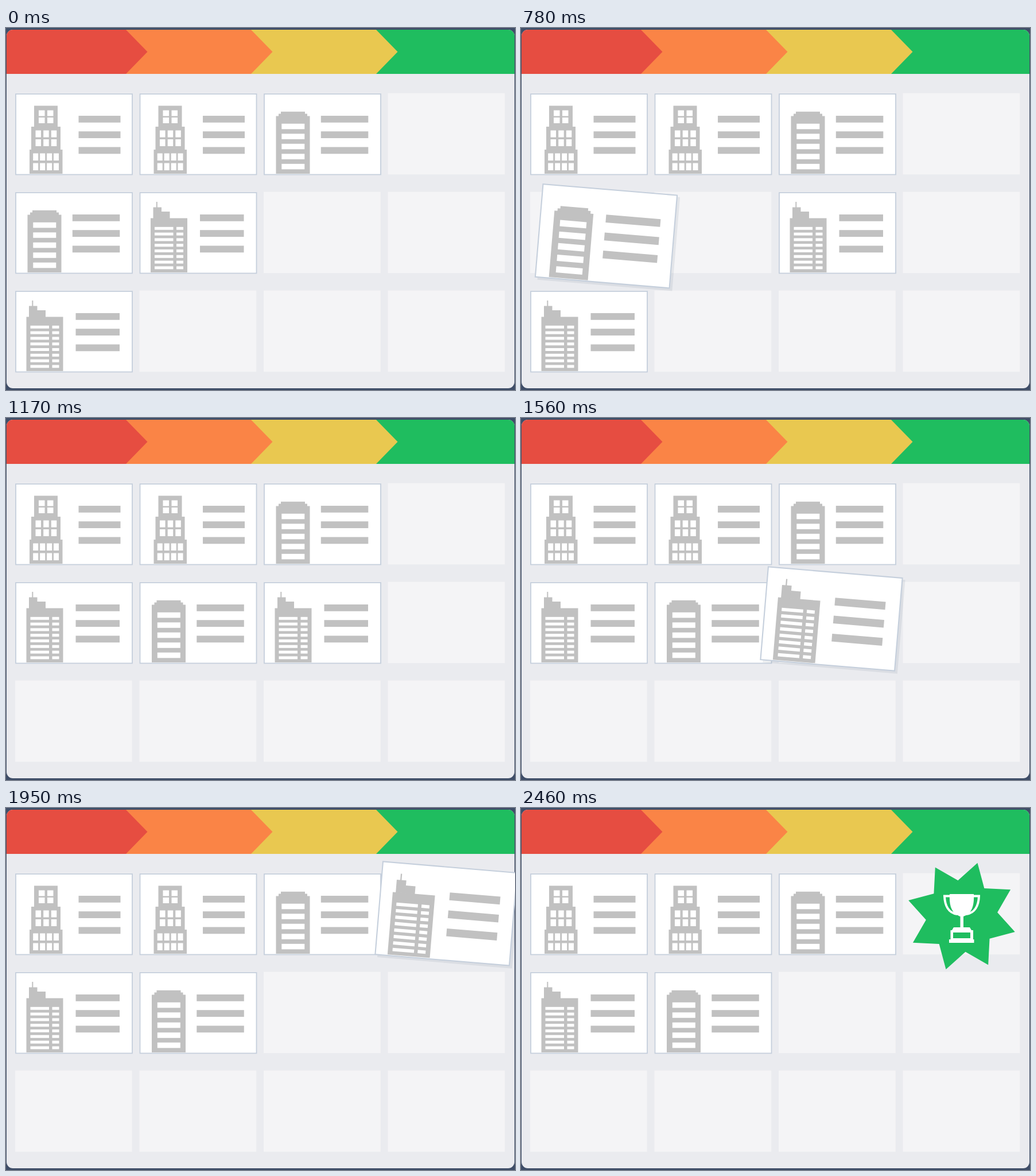
An HTML page that plays this animation: 887x631 px, repeating every 2.55 s.

```html
<!DOCTYPE html>
<html lang="en">
<head>
<meta charset="utf-8">
<title>Pipeline board</title>
<style>
  html, body { margin: 0; width: 100%; height: 100%; overflow: hidden; background: #3f4e68; }
  svg { display: block; width: 887px; height: 631px; }
</style>
</head>
<body>
<svg id="stage" viewBox="0 0 887 631">
  <defs>
    <clipPath id="panel"><rect x="1" y="3" width="885" height="625" rx="11"/></clipPath>
  </defs>
  <g clip-path="url(#panel)">
    <rect width="887" height="631" fill="#eaebef"/>
    <path fill="#1fbd5f" d="M640 3H887V80H640Z"/>
    <path fill="#e9c850" d="M420 3H645L682.5 41.5L645 80H420Z"/>
    <path fill="#fa8446" d="M200 3H427L464.5 41.5L427 80H200Z"/>
    <path fill="#e64d41" d="M0 3H209L246.5 41.5L209 80H0Z"/>
  </g>
  <g id="slots" fill="#f4f4f6"></g>
  <g id="cards"></g>
  <g id="award">
    <path id="star" fill="#1fbd5f" fill-rule="evenodd"/>
    <g transform="translate(-768 -188.5)" fill="#fff">
      <path d="M747 150H789C790 170 786 184 771 189V208H782L785 213H788V229H789.5V235H746V229H748.500V213H751L754 208H765.500V189C750 184 746 170 747 150ZM753 217V227H783V217Z" fill-rule="evenodd"/>
      <path d="M748 153.500H738C738.500 170 745 183 760 185M788 153.500H798C797.500 170 791 183 776 185" fill="none" stroke="#fff" stroke-width="4"/>
    </g>
  </g>
</svg>
<script>
const LOOP = 2550, STEP = 30;
const GRAY = '#c1c1c1';
const $ = id => document.getElementById(id);
const colX = c => 16 + 216.5 * c;
const rowY = r => 114 + 172 * r;
const rect = (x, y, w, h, fill = '') =>
  `<rect x="${x}" y="${y}" width="${w}" height="${h}"${fill && ` fill="${fill}"`}/>`;

function windows(xs, w, y, h, rows, pitch) {
  let out = '';
  for (let r = 0; r < rows; r++)
    for (const x of xs) out += rect(x, y + r * pitch, w, h, '#fff');
  return out;
}

// Buildings in card coordinates, with the left edge and width of the text bars
const kinds = {
  stepped: {
    bars: [110.5, 73],
    art: rect(33, 21.5, 41, 37) + rect(28, 58, 51, 41) + rect(25, 98, 57.5, 42) +
      windows([41, 56], 10.5, 29.5, 10, 2, 12.5) +
      windows([35.5, 49.2, 62.8], 9.5, 64.5, 12, 2, 15.5) +
      windows([31.2, 43.2, 55.2, 67], 9, 104.5, 12.5, 2, 17)
  },
  block: {
    bars: [99.8, 82.5],
    art: rect(30, 31.8, 42, 5) + rect(26, 35.5, 50, 5) + rect(21.5, 39.5, 59, 100.5) +
      windows([31.3], 40, 52.8, 9.5, 5, 17.5)
  },
  office: {
    bars: [105.5, 76.5],
    art: rect(29.3, 17, 2, 11) + rect(24, 26.5, 14.5, 20) + rect(38, 34, 15, 12) +
      rect(19.5, 45.5, 64, 94.5) +
      windows([26.5], 32.5, 60.8, 5, 8, 9.8) + windows([64.5], 12, 60.8, 5, 8, 9.8)
  }
};

function addCard(kind, col, row) {
  const { art, bars: [x, w] } = kinds[kind];
  const g = document.createElementNS('http://www.w3.org/2000/svg', 'g');
  g.innerHTML = `<rect class="shadow" x="4.500" y="3.500" width="204" height="142" fill="#3f4e68" opacity=".09"/>
    <rect x="1" y="1" width="203" height="140.500" fill="#fff"/>
    <g fill="${GRAY}">${art}${[39, 66.2, 93.5].map(y => rect(x, y, w, 11.8)).join('')}</g>
    <rect x="1" y="1" width="203" height="140.500" fill="none" stroke="#c5cfdc" stroke-width="1.800"/>`;
  $('cards').append(g);
  place(g, col, row);
  return g;
}

function place(card, col, row) {
  card.setAttribute('transform', `translate(${colX(col)} ${rowY(row)})`);
  card.querySelector('.shadow').style.display = 'none';
}

function drag(card, [from, bend, to], p) {
  const at = i => (1 - p) ** 2 * from[i] + 2 * p * (1 - p) * bend[i] + p * p * to[i];
  card.setAttribute('transform',
    `translate(${at(0)} ${at(1)}) rotate(4.8) scale(1.155) translate(-102.5 -71.2)`);
  card.querySelector('.shadow').style.display = '';
}

// Share of a move done when it advances once per step, beginning at `start`
const progress = (t, start, count) =>
  Math.min(Math.max(Math.floor((t - start) / STEP) + 1, 0), count) / count;
const mix = (a, b, p) => a + (b - a) * p;

function ring(radius, angle) {
  const a = angle * Math.PI / 180;
  return `${(radius * Math.cos(a)).toFixed(2)} ${(radius * Math.sin(a)).toFixed(2)}`;
}
const turns = [...Array(8).keys()].map(i => i * 45);
const starPath = 'M' + turns.map(a => ring(96.8, a - 28.5) + 'L' + ring(62.5, a - 6)).join('L') + 'Z';
const holePath = 'M' + turns.map(a => ring(57.5, a - 6)).join('L') + 'Z';

for (let r = 0; r < 3; r++)
  for (let c = 0; c < 4; c++)
    $('slots').innerHTML += rect(colX(c), rowY(r) - .3, 203.7, 141.5);

addCard('stepped', 0, 0);
addCard('stepped', 1, 0);
addCard('block', 2, 0);
const riser = addCard('office', 0, 2);
const second = addCard('block', 0, 1);
const first = addCard('office', 1, 1);

const paths = {
  across: [[334.5, 356.5], [456, 385.5], [541, 350]],
  follow: [[118, 356.5], [243, 385], [320, 350]],
  win: [[541, 350], [657, 372], [767, 184]]
};

function drawAward(t) {
  const award = $('award');
  award.style.display = t < 2100 ? 'none' : '';
  if (t < 2100) return;
  const grow = Math.sin(progress(t, 2100, 5) * Math.PI / 2);
  const land = progress(t, 2250, 8);
  const eased = (1 - Math.cos(Math.PI * land)) / 2;
  const x = mix(mix(768, 763, grow), 768, eased);
  const y = mix(mix(188.5, 135, grow), 188.5, eased);
  const scale = mix(1.85 * grow, 1, eased);
  const angle = mix(mix(57, 35, progress(t, 2100, 5)), 0, eased);
  award.setAttribute('transform', `translate(${x} ${y}) rotate(${angle}) scale(${scale})`);
  $('star').setAttribute('d', t < 2250 ? starPath + holePath : starPath);
}

function draw(t) {
  first.style.display = t < 2250 ? '' : 'none';
  if (t < 150) place(first, 1, 1);
  else if (t < 660) drag(first, paths.across, progress(t, 300, 8));
  else if (t < 1560) place(first, 2, 1);
  else if (t < 2100) drag(first, paths.win, progress(t, 1710, 9));
  else place(first, 3, 0);

  if (t < 660) place(second, 0, 1);
  else if (t < 1140) drag(second, paths.follow, progress(t, 780, 8));
  else place(second, 1, 1);

  place(riser, 0, 1 + (1 - progress(t, 930, 9)) ** 1.08);
  drawAward(t);
}

const begin = performance.now();
function tick() {
  draw((performance.now() - begin) % LOOP);
  requestAnimationFrame(tick);
}
tick();
</script>
</body>
</html>
```
